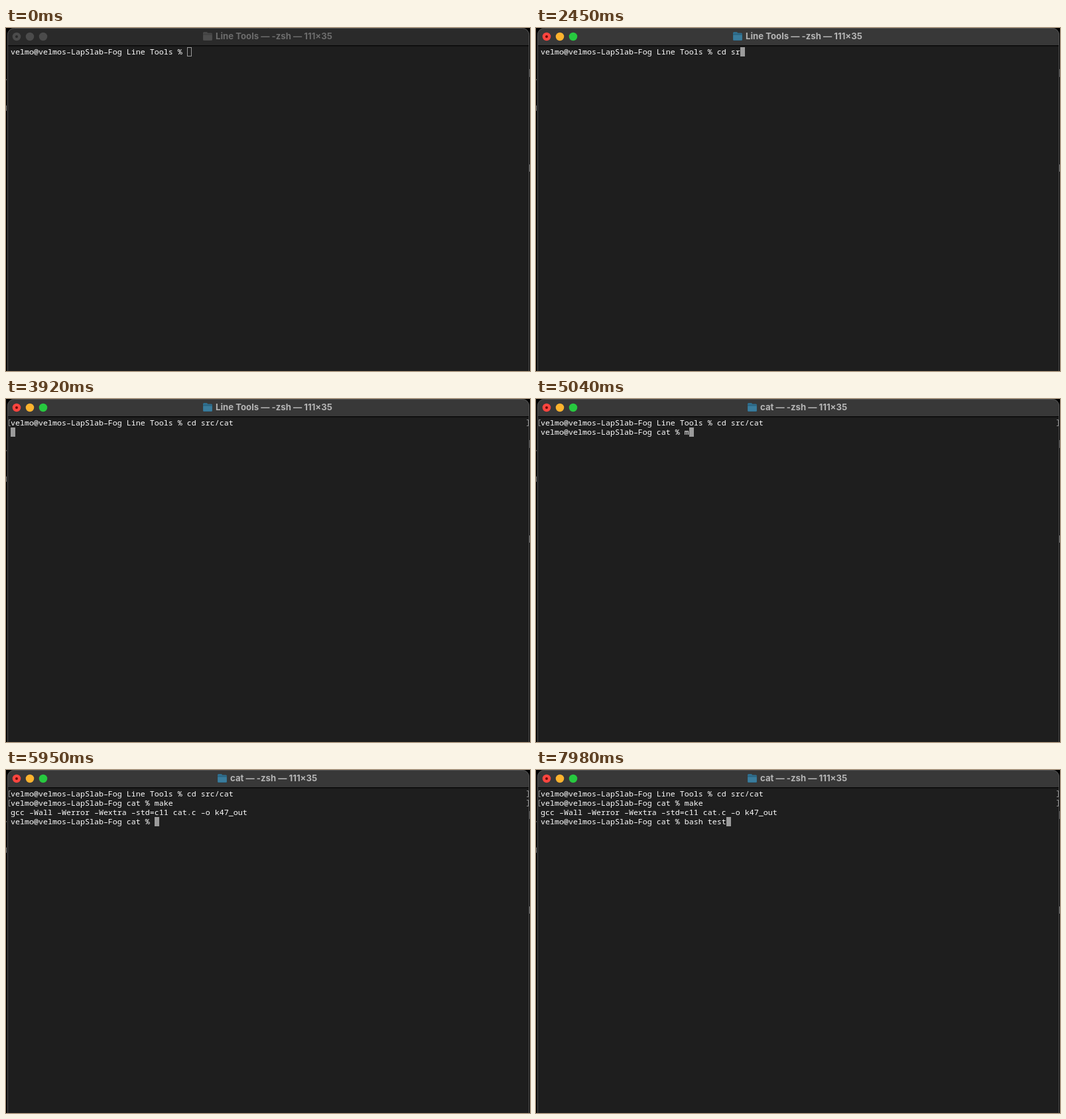
These frames come from a looping animation (790 px wide and 518 px high, 8000 ms). An HTML page with a canvas:

```html
<!DOCTYPE html>
<html lang="en">
<head>
<meta charset="utf-8">
<title>Terminal</title>
<style>
  html, body { margin: 0; width: 100%; height: 100%; overflow: hidden; background: #000; }
  canvas { display: block; }
</style>
</head>
<body>
<canvas id="stage" width="790" height="518"></canvas>
<script>
const ctx = document.getElementById("stage").getContext("2d");
const LOOP = 8000, CELL = 7, ROW = 14, LEFT = 7, TOP = 29;
const FOCUS = 910;
const MONO = '500 11.667px "Noto Sans Mono", "DejaVu Sans Mono", monospace';
const SANS = '700 13.2px Inter, "Open Sans", sans-serif';
const HOST = "velmo@velmos-LapSlab-Fog ";
const FOLDER = "Line Tools";

// Each command: prompt time, prompt, keystrokes [time, text], time of Enter, output
const commands = [
  {
    start: 0, prompt: HOST + FOLDER + " % ",
    keys: [[1750, "cd"], [2030, " "], [2240, "s"], [2450, "r"], [2800, "c"],
           [3010, "/"], [3080, "c"], [3150, "a"], [3570, "t"]],
    enter: 3920
  },
  {
    start: 3990, prompt: HOST + "cat % ",
    keys: [[5040, "m"], [5110, "a"], [5250, "k"], [5390, "e"]],
    enter: 5600,
    output: [5670, "gcc -Wall -Werror -Wextra -std=c11 cat.c -o k47_out"]
  },
  {
    start: 5950, prompt: HOST + "cat % ",
    keys: [[6790, "b"], [6930, "as"], [7070, "h"], [7280, " "],
           [7490, "t"], [7560, "e"], [7840, "s"], [7980, "t"]],
    enter: Infinity
  }
];

const titles = [
  [0, FOLDER + " — -zsh — 111×35"],
  [4060, "cat — -zsh — 111×35"],
  [5670, "cat — clang ◂ make — 111×35"],
  [5950, "cat — -zsh — 111×35"]
];

function rect(x, y, w, h, color) {
  ctx.fillStyle = color;
  ctx.fillRect(x, y, w, h);
}

function disc(x, y, r, color) {
  ctx.fillStyle = color;
  ctx.beginPath();
  ctx.arc(x, y, r, 0, 2 * Math.PI);
  ctx.fill();
}

function text(str, x, y, font, color) {
  ctx.font = font;
  ctx.fillStyle = color;
  ctx.fillText(str, x, y);
}

function windowPath(inset) {
  ctx.beginPath();
  ctx.roundRect(2 + inset, inset, 787 - 2 * inset, 540, 10);
}

function drawFolder(x, active) {
  ctx.fillStyle = active ? "#2f6f8f" : "#484848";
  ctx.beginPath();
  ctx.roundRect(x, 6, 7, 5, 1.5);
  ctx.roundRect(x, 7.5, 14, 11.5, 1.5);
  ctx.fill();
  rect(x, 9.5, 14, 1, active ? "#24566f" : "#3a3a3a");
  rect(x + 0.5, 10.5, 13, 7.5, active ? "#3a7c9c" : "#4d4d4d");
}

function drawTitleBar(t) {
  const active = t >= FOCUS;
  rect(2, 0, 787, 26, active ? "#383838" : "#2a2a2a");
  rect(2, 26, 787, 1.5, "#080808");

  const lights = active ? ["#fe453f", "#fdb32e", "#27c93f"] : Array(3).fill("#4b4b4b");
  lights.forEach((color, i) => disc(16 + 20 * i, 13, 6.25, color));
  disc(16, 13, 2, active ? "#6e0a08" : "#292929");

  const title = titles.filter(([time]) => t >= time).pop()[1];
  ctx.font = SANS;
  const x = Math.round(394.5 - (19 + ctx.measureText(title).width) / 2);
  drawFolder(x, active);
  text(title, x + 19, 17, SANS, active ? "#b5b5b5" : "#6c6c6c");
}

// The terminal face has hyphens nearly as wide as a cell
function drawLine(str, row) {
  text(str.replaceAll("-", "–"), LEFT, TOP + ROW * row + 11, MONO, "#fff");
}

function drawBrackets(row) {
  const y = TOP + ROW * row + 2;
  for (const [stem, arm] of [[4, 4], [787, 785]]) {
    rect(stem, y, 1, 10, "#8a8a8a");
    rect(arm, y, 3, 1, "#8a8a8a");
    rect(arm, y + 9, 3, 1, "#8a8a8a");
  }
}

function drawCursor(column, row, active) {
  const x = LEFT + CELL * column, y = TOP + ROW * row;
  if (active) return rect(x, y, CELL, ROW, "#9b9b9b");
  ctx.strokeStyle = "#9b9b9b";
  ctx.lineWidth = 1;
  ctx.strokeRect(x + 0.5, y + 0.5, CELL - 1, ROW - 1);
}

function drawShell(t) {
  let row = 0, column = 0;
  for (const { start, prompt, keys, enter, output } of commands) {
    if (t < start) break;
    const typed = keys.filter(([time]) => t >= time).map(([, chars]) => chars).join("");
    const line = prompt + typed;
    drawLine(line, row);
    column = line.length;
    if (t < enter) break;
    drawBrackets(row++);
    column = 0;
    if (output && t >= output[0]) drawLine(output[1], row++);
  }
  drawCursor(column, row, t >= FOCUS);
}

function draw(t) {
  rect(0, 0, 790, 518, "#000");
  ctx.save();
  windowPath(0);
  ctx.clip();
  rect(0, 0, 790, 518, "#1e1e1e");
  drawTitleBar(t);
  drawShell(t);
  ctx.restore();

  windowPath(0.5);
  ctx.strokeStyle = "#505050";
  ctx.lineWidth = 1;
  ctx.stroke();

  // Slivers of the desktop beside the window
  rect(0, 77, 1, 2, "#666");
  rect(0, 117, 1, 8, "#888");
  rect(789, 62, 1, 12, "#4c4c4c");
  rect(789, 206, 1, 11, "#666");
}

function frame() {
  draw(performance.now() % LOOP);
  requestAnimationFrame(frame);
}
frame();
</script>
</body>
</html>
```
